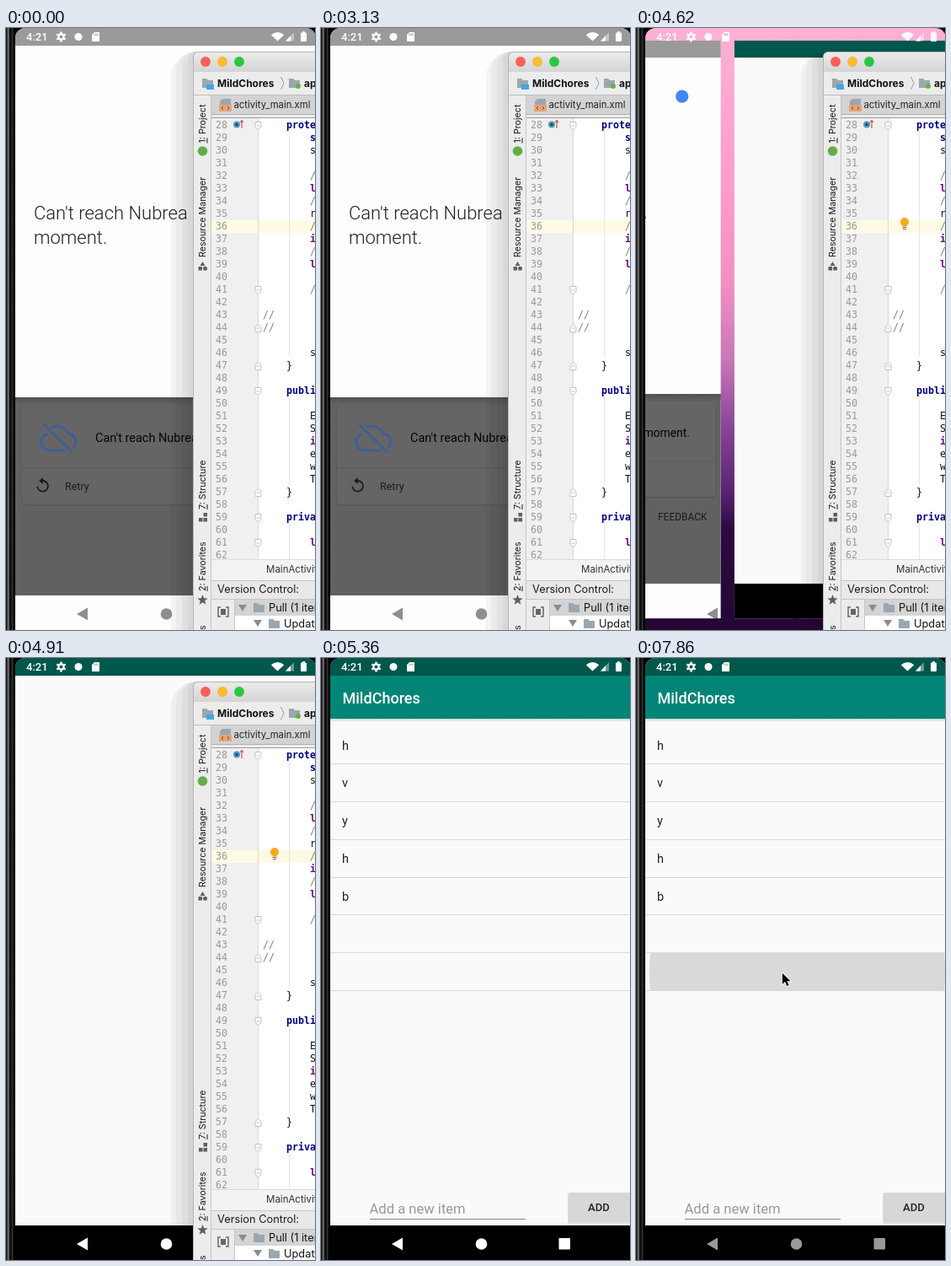
Animation of 367x714 px, one loop 8000 ms. Source, as an HTML page with a canvas:

```html
<!DOCTYPE html>
<html lang="en">
<head>
<meta charset="utf-8">
<style>
html, body { margin: 0; width: 100%; height: 100%; overflow: hidden; background: #000; }
canvas { display: block; width: 367px; height: 714px; }
</style>
</head>
<body>
<canvas id="stage"></canvas>
<script>
const W = 367, H = 714, LOOP = 8000;
const canvas = document.getElementById('stage');
const dpr = window.devicePixelRatio || 1;
canvas.width = W * dpr;
canvas.height = H * dpr;
const c = canvas.getContext('2d');

const ROBOTO = 'Roboto, sans-serif';
const UI = 'Inter, sans-serif';
const MONO = '"DejaVu Sans Mono", monospace';
const CARD_STEP = 374;   // distance between two task cards
const MID_X = 189.5, MID_Y = 349;

// Task switch: [scale, pan] per step
const SLIDE = [[0.985, 0], [0.957, 90], [0.957, 259.7], [0.98, 352]];
// Pointer: [time, x, y]
const POINTER = [
  [5660, 279, 640], [5800, 270, 590], [5950, 262, 540], [6090, 258, 514],
  [6390, 255, 505], [6530, 253, 571], [6830, 238, 500], [6980, 216, 420],
  [7130, 197, 350], [7270, 186, 328], [7410, 177, 352], [7560, 173, 373]
];

function box(x, y, w, h, color) {
  c.fillStyle = color;
  c.fillRect(x, y, w, h);
}
function round(x, y, w, h, r, color) {
  c.beginPath();
  c.roundRect(x, y, w, h, r);
  c.fillStyle = color;
  c.fill();
}
function disc(x, y, r, color) {
  c.beginPath();
  c.arc(x, y, r, 0, Math.PI * 2);
  c.fillStyle = color;
  c.fill();
}
function poly(color, ...p) {
  c.beginPath();
  for (let i = 0; i < p.length; i += 2) c.lineTo(p[i], p[i + 1]);
  c.closePath();
  c.fillStyle = color;
  c.fill();
}
function stroke(d, color, width) {
  c.strokeStyle = color;
  c.lineWidth = width;
  c.stroke(new Path2D(d));
}
function text(s, x, y, font, color) {
  c.font = font;
  c.fillStyle = color;
  c.fillText(s, x, y);
}
function fade(x0, y0, x1, y1, stops) {
  const g = c.createLinearGradient(x0, y0, x1, y1);
  stops.forEach(([at, color]) => g.addColorStop(at, color));
  return g;
}

/* ---------- phone ---------- */

function statusIcons() {
  const white = '#fff';
  text('4:21', 24, 15, '500 13px ' + ROBOTO, white);
  c.strokeStyle = white;
  c.lineWidth = 2.4;
  c.beginPath();
  c.arc(65.5, 10.5, 3.2, 0, Math.PI * 2);
  for (let i = 0; i < 6; i++) {
    const a = i * Math.PI / 3 + Math.PI / 6, u = Math.cos(a), v = Math.sin(a);
    c.moveTo(65.5 + 3 * u, 10.5 + 3 * v);
    c.lineTo(65.5 + 6 * u, 10.5 + 6 * v);
  }
  c.stroke();
  disc(86, 10.5, 4.5, white);
  poly(white, 105, 5, 111, 5, 111, 16, 102, 16, 102, 8);
  for (let i = 0; i < 3; i++) box(104.5 + i * 2, 6.5, 1, 2.5, 'rgba(0,0,0,.4)');
  c.beginPath();
  c.moveTo(322.5, 15.5);
  c.arc(322.5, 15.5, 10.5, -Math.PI * 0.76, -Math.PI * 0.24);
  c.fillStyle = white;
  c.fill();
  poly('rgba(255,255,255,.4)', 332, 15.5, 342, 15.5, 342, 5);
  poly(white, 332, 15.5, 338, 15.5, 338, 9.2);
  round(350, 5.5, 7, 10.5, 1, white);
  box(352, 4, 3, 2, white);
}

function navIcons(color) {
  poly(color, 84, 695, 97, 687.5, 97, 702.5);
  disc(190.5, 695, 6.8, color);
  round(282.5, 688, 13.5, 13.5, 1, color);
}

function searchScreen() {
  const dark = '#1c1c1c';
  box(11, 0, 357, 716, '#fdfdfd');
  box(11, 0, 357, 21, '#9a9a9a');
  disc(320, 69, 8, '#4285f4');
  text("Can't reach Nubrea at the", 33, 227, '300 22px ' + ROBOTO, '#222');
  text('moment.', 33, 256, '300 22px ' + ROBOTO, '#222');

  box(11, 438, 357, 235, '#616161');
  box(11, 438, 357, 7, fade(0, 438, 0, 445, [[0, '#4d524f'], [1, '#616161']]));
  round(18, 447, 345, 120, 6, '#585858');
  round(19, 447, 343, 118, 5, '#656565');
  box(19, 521, 343, 1, '#595959');
  const blue = '#3f5f93';
  stroke('M54 474A14 14 0 0 1 74 481A10 10 0 0 1 80 498M70 501H51A9.8 9.8 0 0 1 50 481.500', blue, 3);
  stroke('M45 470L79 503.500', blue, 3);
  text("Can't reach Nubrea at the moment.", 106, 491, '14.5px ' + ROBOTO, '#050505');
  stroke('M43.500 537A6.300 6.300 0 1 1 37.300 543.500', dark, 1.8);
  poly(dark, 39, 537, 44, 533, 44, 541);
  text('Retry', 70, 548, '12.5px ' + ROBOTO, dark);
  text('FEEDBACK', 290, 594.5, '12.5px ' + ROBOTO, dark);
}

function blankScreen() {
  box(11, 0, 357, 716, '#fafafa');
  box(11, 0, 357, 21, '#00574b');
  box(11, 673, 357, 43, '#000');
}

function todoScreen(pressed) {
  blankScreen();
  box(11, 72, 357, 4, fade(0, 72, 0, 76, [[0, '#d4d4d4'], [1, '#fafafa']]));
  box(11, 21, 357, 51, '#008577');
  text('MildChores', 25.5, 54, '500 18px ' + ROBOTO, '#fff');

  if (pressed) {
    c.save();
    c.beginPath();
    c.rect(11, 350, 357, 45);
    c.clip();
    disc(191.5, 372.5, 175.8, '#d9d9d9');
    c.restore();
  }
  for (let i = 0; i < 7; i++) box(11, Math.round(125 + 44.85 * i), 357, 1, '#d9d9d9');
  [...'hvyhb'].forEach((s, i) =>
    text(s, 25, 108.5 + 44.85 * i, '14.5px ' + ROBOTO, '#212121'));

  text('Add a new item', 57.5, 658.5, '16.6px ' + ROBOTO, '#999');
  box(58, 665, 185, 1, '#858585');
  round(293, 635, 75, 36, 2, '#e2e2e2');
  round(293.5, 634, 74, 35, 2, '#d6d7d7');
  text('ADD', 317, 656, '500 13px ' + ROBOTO, '#222');
}

function wallpaper() {
  box(11, 0, 357, H, fade(0, 0, 0, H, [
    [0, '#ffb0d5'], [0.25, '#ff9dcb'], [0.42, '#f48fc4'], [0.55, '#c978b8'],
    [0.66, '#8a4598'], [0.78, '#54206e'], [0.83, '#2d0a40'], [1, '#230735']
  ]));
}

function bezel() {
  box(0, 0, 11, H, fade(0, 0, 11, 0, [
    [0, '#0c0c0c'], [0.12, '#2a2a2a'], [0.25, '#858585'], [0.38, '#1a1a1a'],
    [0.55, '#080808'], [0.7, '#3a3a3a'], [0.82, '#000'], [1, '#000']
  ]));
}

function phone(t) {
  const step = Math.floor((t - 4320 + 2) / 147.5);
  box(0, 0, W, H, '#000');
  bezel();
  c.save();
  c.beginPath();
  c.roundRect(11, 0, 357, 730, 12);
  c.clip();
  if (step < 0) {
    searchScreen();
  } else if (step < SLIDE.length) {
    const [scale, pan] = SLIDE[step];
    wallpaper();
    c.save();
    c.translate(MID_X - pan, MID_Y);
    c.scale(scale, scale);
    c.translate(-MID_X, -MID_Y);
    searchScreen();
    c.translate(CARD_STEP, 0);
    blankScreen();
    c.restore();
  } else if (t < 5060) {
    blankScreen();
  } else {
    todoScreen(t >= 7860);
  }
  statusIcons();
  const moves = POINTER.filter(p => p[0] <= t).length;
  const glow = 1 - 0.4 * Math.min(1, moves / 6);
  navIcons(step < SLIDE.length ? 'rgba(0,0,0,.44)' : `rgba(255,255,255,${glow})`);
  c.restore();
}

/* ---------- code editor ---------- */

const lineY = n => 115 + 15 * (n - 28);

function folder(x, y, color = '#9aa7b0') {
  poly(color, x, y, x + 5, y, x + 7, y + 2, x + 13, y + 2, x + 13, y + 11, x, y + 11);
}

function sideTab(label, y, underline) {
  c.save();
  c.translate(237, y);
  c.rotate(-Math.PI / 2);
  text(label, 0, 0, '10.7px ' + UI, '#1a1a1a');
  if (underline) box(0, 1.5, 6, 1, '#1a1a1a');
  c.restore();
}

function foldMark(n, up) {
  const y = lineY(n) + 1, k = up ? -1 : 1;
  c.beginPath();
  [[-3.5, -4.5], [3.5, -4.5], [3.5, 1.5], [0, 4.5], [-3.5, 1.5]]
    .forEach(([u, v]) => c.lineTo(299.5 + u, y + k * v));
  c.closePath();
  c.fillStyle = '#fff';
  c.fill();
  c.strokeStyle = '#c2c2c2';
  c.lineWidth = 1;
  c.stroke();
  box(297.5, y - 0.5, 4, 1, '#c2c2c2');
}

function code(n, x, s, color, bold) {
  text(s, x, lineY(n) + 4, (bold ? 'bold ' : '') + '11.63px ' + MONO, color);
}

function shadow(wide) {
  const edges = wide ? [196, 202, 209, 216] : [210, 214, 218];
  edges.forEach(x => round(x, 28, 220, 730, 222 - x + 4, `rgba(0,0,0,${wide ? 0.04 : 0.022})`));
}

function titleBar(active) {
  const fill = active ? fade(0, 28, 0, 52, [[0, '#ececec'], [1, '#d4d4d4']]) : '#f5f5f5';
  round(222, 28, 180, 40, 6, '#b4b4b4');
  round(223, 29, 180, 40, 5, fill);
  ['#ff5f57', '#fdbc2e', '#28c840'].forEach((color, i) => {
    const x = 237 + 20 * i;
    disc(x, 40, 6, active ? 'rgba(0,0,0,.12)' : '#cecece');
    disc(x, 40, active ? 5.9 : 5.4, active ? color : '#dedede');
  });
}

function editorHead() {
  box(223, 52, 144, 28, '#ececec');
  folder(233, 60);
  box(238, 67, 9, 6, '#3fa9dc');
  text('MildChores', 251, 69.5, 'bold 12px ' + UI, '#111');
  stroke('M326.500 58L330 65.500L326.500 73', '#9a9a9a', 1);
  folder(336, 60);
  disc(347, 69, 3, '#62b543');
  text('app', 354, 69.5, 'bold 12px ' + UI, '#111');
  box(223, 79, 144, 1, '#bdbdbd');
  box(244, 80, 123, 22, '#d3d3d3');
  poly('#9aa7b0', 257, 84, 267, 84, 267, 91, 254, 91, 254, 87);
  box(253, 91, 15, 8, '#e8a375');
  stroke('M258 93L256 95L258 97M263 93L265 95L263 97', '#7a4a2c', 1);
  text('activity_main.xml', 270.5, 95, '11.3px ' + UI, '#222');
  box(244, 102, 123, 1, '#b0b0b0');
  box(244, 103, 123, 3, '#ececec');
  box(244, 106, 123, 1, '#9c9c9c');
}

function sideStrip() {
  box(223, 80, 20, H - 80, '#ececec');
  box(243, 80, 1, H - 80, '#c4c4c4');
  const grey = '#5f5f5f';
  sideTab('1: Project', 136.5, true);
  disc(233.5, 146, 5.8, '#62ad4a');
  sideTab('Resource Manager', 272, false);
  poly(grey, 233.5, 277, 236.5, 282, 230.500, 282);
  box(228.5, 283, 4.5, 4.5, grey);
  disc(236.5, 285.3, 2.5, grey);
  sideTab('7: Structure', 571, true);
  box(234.5, 575, 4.5, 4.5, grey);
  box(229, 581, 4.5, 4.5, grey);
  box(234.5, 581, 4.5, 4.5, grey);
  sideTab('2: Favorites', 668, true);
  const star = [];
  for (let i = 0; i < 10; i++) {
    const a = i * Math.PI / 5 - Math.PI / 2, r = i % 2 ? 2.8 : 6.5;
    star.push(233.5 + r * Math.cos(a), 678.5 + r * Math.sin(a));
  }
  poly(grey, ...star);
  sideTab('s', 714, false);
}

function editorBody(bulb, gutterIcon) {
  const navy = '#000080', violet = '#660e7a', grey = '#808080', ink = '#111';
  box(244, 107, 56, 523, '#f0f0f0');
  box(300, 107, 67, 523, '#fff');
  box(244, 228, 123, 15, '#fffae3');
  box(299, 107, 1, 523, '#d9d9d9');
  box(336, 123, 1, 267, '#e4e4e4');
  box(336, 438, 1, 104, '#e4e4e4');
  box(336, 588, 1, 42, '#e4e4e4');

  for (let n = 28; n <= 62; n++) code(n, 249, String(n), '#999');
  [28, 41, 49, 59, 61].forEach(n => foldMark(n));
  [44, 47, 57].forEach(n => foldMark(n, true));
  if (gutterIcon) {
    disc(274, 114.5, 4, '#4b9cc0');
    disc(274, 114.5, 1.8, '#1f4a5c');
    stroke('M280 119V110M278 112L280 109.500L282 112', '#d0574d', 1.2);
  }

  code(28, 333, 'protected', navy, true);
  code(49, 333, 'public', navy, true);
  code(59, 333, 'private', navy, true);
  code(29, 361, 's', navy, true);
  [32, 34, 36, 38, 41].forEach(n => code(n, 361, '//', grey));
  [43, 44].forEach(n => code(n, 305, '//', grey));
  [[33, 'l'], [37, 'i'], [39, 'l'], [53, 'i'], [61, 'l']].forEach(([n, s]) => code(n, 361, s, violet, true));
  [[30, 's'], [35, 'r'], [46, 's'], [51, 'E'], [52, 'S'], [54, 'e'], [55, 'w'], [56, 'T']]
    .forEach(([n, s]) => code(n, 361, s, ink));
  [47, 57].forEach(n => code(n, 333, '}', ink));

  if (bulb) {
    disc(319, 230, 5, '#f4a91d');
    box(316.5, 233, 5, 2.5, '#f4a91d');
    box(316.5, 236, 5, 1, '#6e6e6e');
    box(317, 238, 4, 1, '#6e6e6e');
  }
}

function editorFoot() {
  box(244, 630, 123, 25, '#f3f3f3');
  box(244, 630, 123, 1, '#dadada');
  text('MainActivity', 309, 646, '11.5px ' + UI, '#333');
  box(244, 655, 123, 22, '#e8e8e8');
  box(244, 655, 123, 1, '#c6c6c6');
  text('Version Control:', 251, 669.5, '12.8px ' + UI, '#1c1c1c');
  box(244, 677, 28, 37, '#ececec');
  box(244, 677, 123, 1, '#c6c6c6');
  box(272, 678, 95, 36, '#fff');
  box(272, 678, 95, 19, '#d4d4d4');
  box(271, 678, 1, 36, '#c6c6c6');
  stroke('M255 687H252V698H255M261 687H264V698H261', '#666', 1.5);
  box(255, 689, 6, 7, '#666');
  const mark = '#8c8c8c';
  poly(mark, 276, 684, 286, 684, 281, 692);
  folder(294, 682);
  text('Pull (1 item)', 312, 692, '12.8px ' + UI, '#111');
  poly(mark, 294, 702, 304, 702, 299, 710);
  folder(312, 701);
  text('Update', 330, 711, '12.8px ' + UI, '#111');
}

function editor(t) {
  const away = t >= 1340 && t < 3130;
  shadow(t < 1490 || t >= 3130);
  titleBar(!away);
  box(222, 52, 1, H - 52, '#b4b4b4');
  editorHead();
  sideStrip();
  editorBody((t >= 150 && t < 1340) || t >= 4320, t < 3580 || t >= 3730);
  editorFoot();
}

function pointer(t) {
  const at = POINTER.filter(p => p[0] <= t).pop();
  if (!at) return;
  c.save();
  c.translate(at[1], at[2]);
  const arrow = new Path2D('M.8 .8V14L4 11L6.200 16L8.600 15L6.400 10.200H10.600Z');
  c.lineJoin = 'round';
  c.strokeStyle = '#fff';
  c.lineWidth = 2;
  c.stroke(arrow);
  c.fillStyle = '#000';
  c.fill(arrow);
  c.restore();
}

const start = performance.now();
function draw() {
  const t = (performance.now() - start) % LOOP;
  c.setTransform(dpr, 0, 0, dpr, 0, 0);
  phone(t);
  if (t < 5360) editor(t);
  pointer(t);
  requestAnimationFrame(draw);
}
draw();
</script>
</body>
</html>
```
